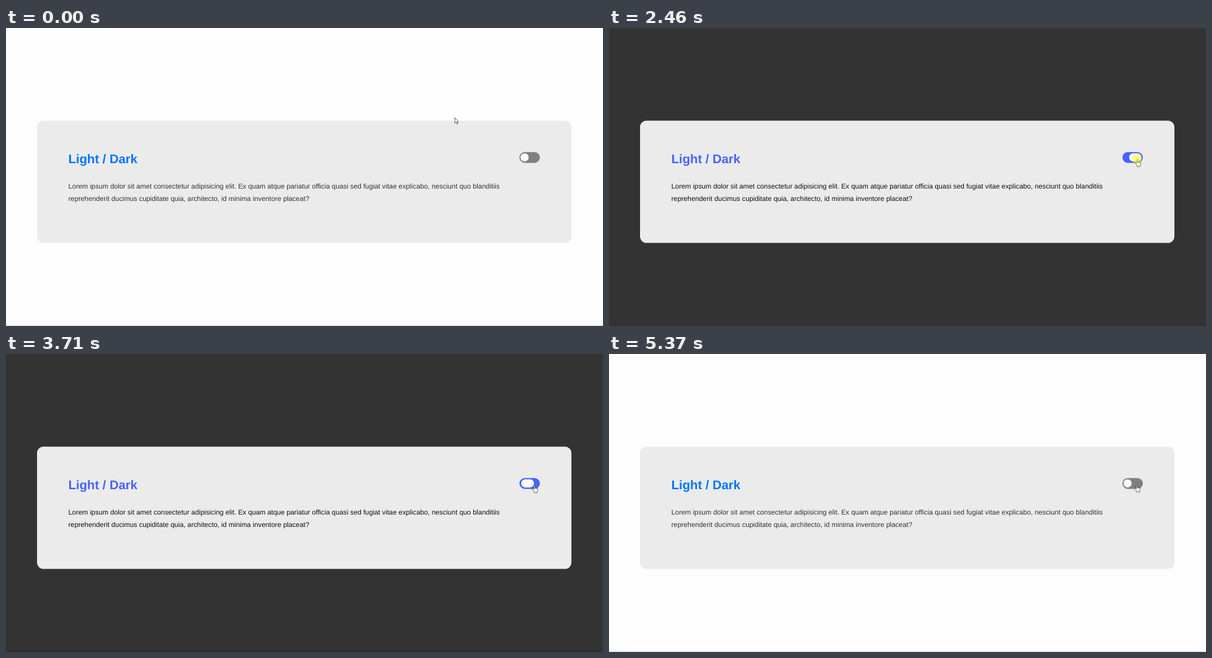
These frames come from a looping animation (1058 px wide and 529 px high, 5390 ms). An HTML page:

```html
<!DOCTYPE html>
<html lang="en">
<head>
<meta charset="utf-8">
<title>Light / Dark</title>
<style>
  html, body { margin: 0; width: 100%; height: 100%; overflow: hidden; }
  svg { display: block; width: 100%; height: 100%; }
  text { font-family: "Liberation Sans", Arial, sans-serif; text-rendering: geometricPrecision; }
  svg { --bg: #fdfdfd; --edge: #c9c9c9; --accent: #0075ff; --track: #808080; --ink: #333; }
  svg.dark { --bg: #333; --edge: #2b2b2b; --accent: #4763ff; --track: #4763ff; --ink: #111; }
  .bg { fill: var(--bg); }
  .edge { fill: var(--edge); }
  .title { fill: var(--accent); font-size: 22.25px; font-weight: bold; }
  .body { fill: var(--ink); font-size: 12.25px; }
  .track { fill: var(--track); }
  .cursor { fill: #fff; stroke: #111; stroke-width: 1.1; stroke-linejoin: round; }
</style>
</head>
<body>
<svg id="stage" viewBox="0 0 1058 529">
  <rect class="bg" width="1058" height="529"/>
  <rect class="edge" y="528" width="1058" height="1"/>
  <rect x="55" y="164.5" width="947" height="217" rx="11.5" fill="#ebebeb"/>
  <text class="title" x="110.5" y="240">Light / Dark</text>
  <text class="body" x="110.5" y="285">Lorem ipsum dolor sit amet consectetur adipisicing elit. Ex quam atque pariatur officia quasi sed fugiat vitae explicabo, nesciunt quo blanditiis</text>
  <text class="body" x="110.5" y="307">reprehenderit ducimus cupiditate quia, architecto, id minima inventore placeat?</text>
  <rect class="track" x="909.8" y="220.2" width="36.4" height="19.2" rx="9.6"/>
  <rect id="knob" y="222.5" height="14.4" rx="7.2" fill="#fff"/>
  <g id="pointer">
    <g class="cursor" transform="scale(.62)">
      <path id="arrow" d="M.5.5V16.5L4.2 13l2.4 5.5 2.2-1-2.4-5.3h5z"/>
      <path id="hand" transform="translate(-6.5 -.5)" d="M5.5 12V2a1.5 1.5 0 0 1 3 0v5q2-.8 2.7.6q2-.6 2.6.8q2.6-.4 2.7 1.8v4.3q0 2-1.2 4V21.5H6.5V19q-1.5-1-2.8-3.6L.9 12.2q-.6-1.6.6-2q1-.3 2 .7zM8.5 7v4M11.2 7.6V11M13.8 8.4V11"/>
    </g>
    <circle id="glow" cx="-.4" cy="-.8" r="8.4" fill="#ff0" fill-opacity=".5"/>
  </g>
</svg>
<script>
const $ = id => document.getElementById(id);
const LOOP = 5390, FADE = 300;
const LEFT = 911.9, RIGHT = 943.8, SIZE = 14.3, WIDE = 28.3;

// press: knob starts to widen, on/off: click highlight, up: release
const clicks = [
  { press: 1225, on: 1170, off: 1275, up: 1315 },
  { press: 2366, on: 2400, off: 2495, up: 2495 },
  { press: 3554, on: 3580, off: 3675, up: 3675 },
  { press: 4640, on: 4650, off: 4745, up: 4745 }
];

// pointer path: time, x, y
const path = [
  [0, 795, 159], [30, 798, 160], [130, 850, 184], [240, 953, 229],
  [340, 1005, 248], [400, 1000, 247], [480, 954, 237], [550, 936, 233],
  [5325, 936, 233], [5330, 935.5, 232.5], [5365, 935.5, 232.5], [5370, 935, 232]
];

const mix = (a, b, k) => a + (b - a) * k;
const clamp = v => Math.min(1, Math.max(0, v));
const bez = (a, b, u) => 3 * a * u * (1 - u) ** 2 + 3 * b * u * u * (1 - u) + u ** 3;

// CSS "ease": cubic-bezier(.25, .1, .25, 1)
function ease(p) {
  p = clamp(p);
  let lo = 0, hi = 1;
  for (let i = 0; i < 20; i++) {
    const mid = (lo + hi) / 2;
    if (bez(.25, .25, mid) < p) lo = mid; else hi = mid;
  }
  return bez(.1, 1, lo);
}

function pointerAt(t) {
  const i = path.findIndex(p => p[0] > t);
  if (i < 0) return path[path.length - 1].slice(1);
  const a = path[i - 1], b = path[i], k = (t - a[0]) / (b[0] - a[0]);
  return [mix(a[1], b[1], k), mix(a[2], b[2], k)];
}

const grown = (c, t) => mix(SIZE, WIDE, ease((t - c.press) / FADE));

function knobAt(t) {
  let side = 0, width = SIZE;
  clicks.forEach((c, i) => {
    if (t < c.on) return;
    const was = i % 2;
    if (t < c.up) {
      side = was;
      width = grown(c, t);
    } else {
      const k = ease((t - c.up) / FADE);
      side = mix(was, 1 - was, k);
      width = mix(grown(c, c.up), SIZE, k);
    }
  });
  return { x: mix(LEFT, RIGHT - width, side), width };
}

const show = (id, on) => $(id).setAttribute("visibility", on ? "visible" : "hidden");

function draw(t) {
  const knob = knobAt(t), [x, y] = pointerAt(t);
  $("stage").classList.toggle("dark", clicks.filter(c => t >= c.up).length % 2 === 1);
  $("knob").setAttribute("x", knob.x);
  $("knob").setAttribute("width", knob.width);
  $("pointer").setAttribute("transform", `translate(${x} ${y})`);
  show("arrow", t < 580);
  show("hand", t >= 580);
  show("glow", clicks.some(c => t >= c.on && t < c.off));
}

const start = performance.now();
function tick() {
  draw((performance.now() - start) % LOOP);
  requestAnimationFrame(tick);
}
tick();
</script>
</body>
</html>
```
